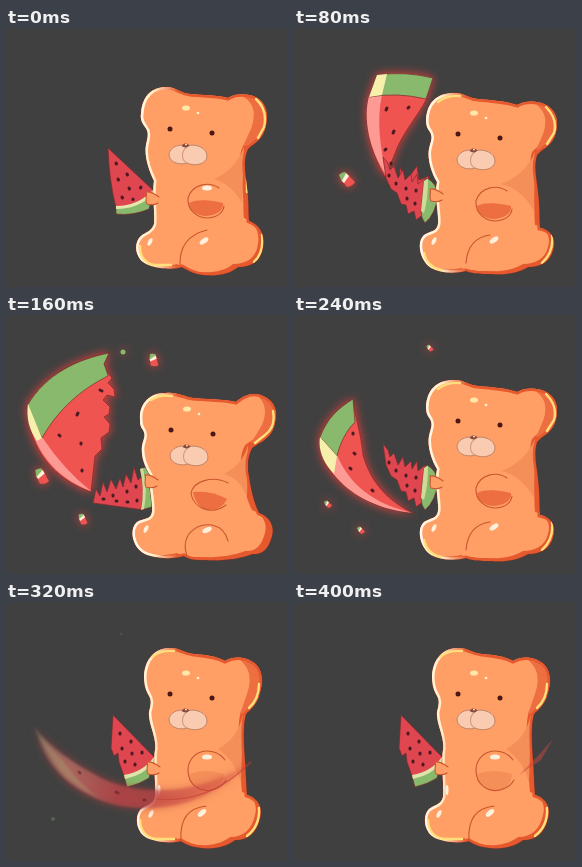
Write an HTML page without scripts that moves like this. It is 282 by 259 pixels and loops after 480 ms.

```html
<!DOCTYPE html>
<html lang="en">
<head>
<meta charset="utf-8">
<title>Gummy bear and watermelon</title>
<style>
html, body { margin: 0; width: 100%; height: 100%; overflow: hidden; background: #404040; }
svg { display: block; width: 100%; height: 100%; }

.pose { visibility: hidden; animation: once .48s step-end infinite; animation-delay: calc(var(--at) * 80ms - 480ms); }
.twice { animation-name: twice; }
.hold { animation-name: hold; }
@keyframes once { 0% { visibility: visible } 16.666%, 100% { visibility: hidden } }
@keyframes hold { 0% { visibility: visible } 33.333%, 100% { visibility: hidden } }
@keyframes twice {
  0%, 33.333% { visibility: visible }
  16.666%, 49.999%, 100% { visibility: hidden }
}

.edge { fill: #e6592f; stroke: #6d352a; stroke-width: 1.2; }
.skin { fill: #ff9f65; }
.rim { fill: none; stroke: url(#rim); stroke-width: 5; }
.shade { fill: #f58f59; }
.deep { fill: #ec6e41; }
.line { fill: none; stroke: #c9552f; stroke-width: 1.1; stroke-linecap: round; }
.gold { fill: none; stroke: #ffdf7c; stroke-width: 2.4; stroke-linecap: round; }
.shine { fill: #fff0dc; }
.red { fill: #ef5450; }
.held .red { fill: #df4650; }
.pink { fill: #fc9a93; }
.green { fill: #88b96c; }
.cream { fill: #f6f0ac; }
.seed { fill: none; stroke: #4a1b20; stroke-width: 3; stroke-linecap: round; }
.cut { stroke: #7b2b2b; stroke-width: .7; stroke-linejoin: round; }
.glow { filter: drop-shadow(0 0 5px #e8403c); }
</style>
</head>
<body>
<svg viewBox="0 0 282 259">
<defs>
  <linearGradient id="rim" gradientUnits="userSpaceOnUse" x1="128" y1="0" x2="172" y2="0">
    <stop stop-color="#fffaf0"/><stop offset=".45" stop-color="#fff0cc"/><stop offset="1" stop-color="#e6592f"/>
  </linearGradient>
  <linearGradient id="trail" gradientUnits="userSpaceOnUse" x1="28" y1="125" x2="240" y2="175">
    <stop stop-color="#c8a08c" stop-opacity=".15"/><stop offset=".2" stop-color="#b57a70" stop-opacity=".65"/>
    <stop offset=".45" stop-color="#b8454a" stop-opacity=".7"/><stop offset="1" stop-color="#d8493f" stop-opacity=".25"/>
  </linearGradient>

  <clipPath id="sitClip"><path id="sit" d="M135 86C136 68 146 59 160 59C171 59 173 65 184 66S212 67 222 70C230 65 240 66 247 68C259 72 263 84 260 97C257 112 249 114 242 121C236 133 240 148 241 160C243 175 242 185 243 193C254 197 259 207 257 219C255 233 246 239 232 239C224 246 212 248 198 247C188 246 183 243 176 239C168 242 150 241 140 236C129 230 127 215 135 208C140 204 146 203 148 196C149 185 146 165 148 153C143 143 138 128 140 117C142 108 143 104 139 99C136 95 134 91 135 86Z"/></clipPath>
  <clipPath id="chewClip"><path id="chew" d="M132 92C133 74 143 66 158 65C170 64 173 70 184 71S212 73 223 77C232 72 243 73 250 76C262 81 265 92 262 104C259 117 250 119 243 127C239 140 243 152 244 165C246 180 245 190 246 200C258 202 262 212 259 222C256 234 246 239 234 239C224 245 212 247 198 246C188 246 180 246 172 243C160 246 146 245 137 240C126 233 122 214 130 207C136 203 143 204 144 196C145 185 140 168 143 154C138 146 133 132 135 121C137 112 139 110 136 104C133 100 132 97 132 92Z"/></clipPath>
  <clipPath id="squashClip"><path id="squash" d="M134 104C133 88 145 77 160 78C172 77 178 82 187 83S218 84 230 87C239 79 249 77 257 81C269 86 272 97 269 107C267 122 256 126 246 133C241 143 241 152 243 162C245 176 248 188 253 198C266 203 269 214 265 224C262 234 256 240 246 239C234 244 216 246 200 245C190 245 184 245 178 241C164 245 146 243 137 238C126 231 123 214 131 207C137 203 145 205 146 197C147 185 142 172 144 160C138 150 135 141 136 131C138 122 140 121 137 115C134 111 134 108 134 104Z"/></clipPath>
  <clipPath id="tallClip"><path id="tall" d="M138 74C139 56 150 46 164 46C175 46 177 51 188 52S210 54 219 59C228 54 238 55 245 59C256 64 258 78 254 90C251 103 246 105 240 112C236 125 238 145 239 160C240 175 240 184 241 193C252 196 257 206 254 216C251 230 243 238 229 238C220 245 208 247 196 246C187 245 181 243 175 239C165 242 150 240 141 236C130 230 128 214 135 207C140 203 147 203 149 195C150 183 147 160 149 148C151 135 142 122 143 110C145 102 146 98 142 92C139 87 138 80 138 74Z"/></clipPath>

  <g id="face">
    <ellipse class="shine" cx="16" cy="-21" rx="4" ry="2.6" style="fill:#ffe9a8"/>
    <circle class="shine" cx="28" cy="-16" r="1.3"/>
    <circle r="2.5" fill="#4a1714"/><circle cx="42" cy="4" r="2.5" fill="#4a1714"/>
    <path d="M17 17C8 14-1 19-1 26C0 35 12 36 17 34C25 38 37 35 37 27C37 19 26 14 17 17Z" fill="#f9cbb0" stroke="#b97e64" stroke-width=".9"/>
    <path class="line" d="M17 18C11 22 11 31 17 34" style="stroke:#d39a80"/>
    <path d="M11.500 17Q15 12 19.500 16.500Q16 20 11.500 17Z" fill="#8a4a3a"/>
    <circle cx="16" cy="15.500" r="1" fill="#ffe0c8"/>
  </g>
  <g id="arm">
    <path class="deep" d="M-17 2C-8-3 8 0 17 2C18 10 9 15-1 15C-10 14-16 10-17 2Z"/>
    <path class="line" d="M13-13C3-20-14-17-18-3C-19 10-8 17 2 17C12 16 17 12 18 5"/>
  </g>
  <g id="paw">
    <path class="skin" d="M-5-6C0-7 6-3 8 1C8 6 2 8-4 6C-6 2-4-1-5-6Z"/>
    <path class="line" d="M8-1C4-4 0-7-5-6C-3-2-7 2-4 6Q2 8 7 5"/>
  </g>
  <g id="bit">
    <path class="red" d="M-2-7L8 3Q6 7 0 8L-4 3Z"/>
    <path class="green" d="M-8-4Q-5-7-2-7L0-3L-5 3Z"/>
    <path d="M-1-6L2-3L-3 4L-5 2Z" fill="#fff0d8"/>
  </g>
  <g id="wedge" class="held">
    <path class="red cut" d="M0 0L46 43Q30 60 8 60Q1 32 0 0Z"/>
    <path class="green cut" d="M46 43L41 61Q25 68 8 66L8 59Q30 59 46 43Z"/>
    <path d="M8 58Q30 58 45 42L45 46Q31 61 8 61Z" fill="#e3e7ac"/>
    <path class="seed" d="M8 15l.5 1M19 26l.5 1M10 31l.5 1M21 40l.5 1M33 39l-.5 1M14 49l.5 1M25 51v.5"/>
  </g>
  <g id="rag" class="held">
    <path class="red cut" d="M89 129L94 135L96 142L100 138L104 150L109 142L111 152L117 146L118 154L123 146L124 156L131 150L130 186L122 192L120 183L114 186L112 177L107 176L103 165L97 161L92 150Z"/>
    <path class="green cut" d="M133 150Q142 155 144 166Q142 186 131 195Q127 190 127 183L130 153Z"/>
    <path d="M130 153L134 151Q134 171 130 185L127 183Z" fill="#cddb96"/>
    <path class="seed" d="M95 147v1M102 155v1M112 160v1M113 170v1M122 162v1M121 175v1"/>
  </g>
</defs>

<g class="pose" style="--at:0">
  <use href="#wedge" x="102" y="120"/>
  <use href="#sit" class="edge"/>
  <g clip-path="url(#sitClip)">
    <use href="#sit" class="skin" x="-5" y="-3"/>
    <path class="deep" d="M234 67Q254 76 245 101L237 118L265 114V65Z"/>
    <path class="shade" d="M238 119Q229 142 208 151Q226 157 236 175Z"/>
    <use href="#sit" class="rim"/>
    <path class="gold" d="M250 71Q262 82 258 99L252 110M256 207Q258 225 248 234M241 150v14M134 218Q134 234 148 237H165"/>
  </g>
  <path class="line" d="M174 237Q173 209 201 202"/>
  <use href="#arm" x="200" y="173"/>
  <ellipse class="shine" cx="201" cy="160" rx="5" ry="2.500"/>
  <ellipse class="shine" cx="198" cy="213" rx="5" ry="2.500" transform="rotate(-35 198 213)"/>
  <ellipse class="shine" cx="144" cy="214" rx="2" ry="4" transform="rotate(25 144 214)"/>
  <use href="#face" x="164" y="101"/>
  <use href="#paw" x="145" y="170"/>
</g>

<g class="pose glow" style="--at:1">
  <path class="red cut" d="M75 68Q105 64 133 70C125 87 107 106 100 128L91 149C75 121 69 91 75 68Z"/>
  <path class="pink" d="M75 68L88 67C82 94 87 121 92 147C75 121 69 91 75 68Z"/>
  <path class="green cut" d="M83 47Q111 43 139 50L132 71Q103 64 75 69Z"/>
  <path class="cream" d="M83 47L93 46L88 67L75 69Z"/>
  <path class="seed" d="M93 80l-1 2M115 79l-1 1M100 103l-1 2M92 121l-1 1M97 135v1"/>
  <use href="#bit" x="53" y="151"/>
</g>
<g class="pose held" style="--at:1"><path class="red cut" d="M91 148L105 164L106 139L112 153L123 138L125 152L135 148L132 166L110 168L98 161Z"/></g>

<g class="pose glow" style="--at:3">
  <path class="red cut" d="M59 84C61 102 67 118 69 140C77 168 94 186 119 198C79 195 46 174 31 148C20 121 38 97 59 84Z"/>
  <path class="pink" d="M43 140C55 169 79 189 119 198C80 194 54 178 39 158Z"/>
  <path class="green cut" d="M59 84L61 107C52 116 46 128 43 141L26 122C33 104 43 94 59 84Z"/>
  <path class="cream" d="M26 122L43 141L40 159C29 148 24 135 26 122Z"/>
  <path class="seed" d="M59 118v1M60 138l1 1M56 153l1 1M78 175l1 1"/>
  <use href="#bit" transform="translate(136 33) scale(.45)"/>
  <use href="#bit" transform="translate(34 189) scale(.5)"/>
  <use href="#bit" transform="translate(67 215) scale(.5)"/>
</g>

<g class="pose twice" style="--at:1">
  <use href="#rag"/>
  <use href="#chew" class="edge"/>
  <g clip-path="url(#chewClip)">
    <use href="#chew" class="skin" x="-5" y="-3"/>
    <path class="deep" d="M238 74Q257 84 249 106L242 122L268 120V72Z"/>
    <path class="shade" d="M241 124Q231 147 207 156Q228 161 240 183Z"/>
    <use href="#chew" class="rim"/>
    <path class="gold" d="M252 79Q264 91 260 105L253 116M258 207Q260 224 248 235M144 74Q153 67 166 68M130 225Q133 239 147 242"/>
  </g>
  <path class="line" d="M172 235Q174 210 196 207"/>
  <use href="#arm" x="200" y="176"/>
  <ellipse class="shine" cx="200" cy="212" rx="5" ry="2.500" transform="rotate(-35 200 212)"/>
  <ellipse class="shine" cx="140" cy="213" rx="2" ry="4" transform="rotate(25 140 213)"/>
  <use href="#face" x="164" y="106"/>
  <use href="#paw" x="141" y="167"/>
</g>

<g class="pose" style="--at:2">
  <g class="glow">
    <path class="red cut" d="M103 38L98 49L101 57L106 63L102 68L108 74L109 82L101 80L97 85L104 92L103 99L98 102L104 109L103 117L95 123L96 134L89 141L85 177C49 164 23 136 21 91C40 58 73 44 103 38Z"/>
    <path class="pink" d="M36 122Q58 155 85 176C57 166 37 146 28 121Z"/>
    <path class="green cut" d="M103 38L98 49L101 57L102 61C76 74 53 93 36 123L21 91C40 58 73 44 103 38Z"/>
    <path class="cream" d="M22 89L36 123L31 126C23 115 20 102 22 89Z"/>
    <path class="seed" d="M94 75l2 1M72 98l-1 2M53 120l1 1M75 128v1M76 155v1"/>
    <use href="#bit" transform="translate(148 45) rotate(30) scale(.8)"/>
    <use href="#bit" transform="translate(36 161) rotate(15)"/>
    <use href="#bit" transform="translate(77 204) rotate(20) scale(.7)"/>
    <circle class="green" cx="117" cy="37" r="2.500"/>
  </g>
  <g class="held">
    <path class="red cut" d="M87 188L90 174L94 181L97 167L101 177L105 164L110 174L114 163L117 172L120 159L125 168L128 152L132 165L140 158L138 195Z"/>
    <path class="green cut" d="M134 154L143 151Q150 172 146 192L135 195Q140 174 134 154Z"/>
    <path d="M134 154L137 153Q142 174 138 194L135 195Q139 174 134 154Z" fill="#cddb96"/>
    <path class="seed" d="M97 184h1M107 180v1M110 186h1M121 176v1M121 187h1M130 171v1M131 185v1"/>
  </g>
  <use href="#squash" class="edge"/>
  <g clip-path="url(#squashClip)">
    <use href="#squash" class="skin" x="-7" y="-3"/>
    <path class="deep" d="M248 78Q265 89 256 110L245 128L275 126V76Z"/>
    <path class="shade" d="M242 130Q237 149 218 159Q235 164 241 183Z"/>
    <use href="#squash" class="rim"/>
    <path class="gold" d="M267 96Q270 112 259 120L249 128M145 85Q154 79 166 81"/>
  </g>
  <path class="deep" d="M187 177Q205 175 221 184Q216 195 203 195Q190 193 187 177Z"/>
  <path class="line" d="M222 168C207 160 186 166 185 179C188 193 205 201 220 190M181 241C174 220 190 208 206 210Q219 213 222 226"/>
  <ellipse class="shine" cx="201" cy="215" rx="5" ry="2.500" transform="rotate(-25 201 215)"/>
  <ellipse class="shine" cx="140" cy="214" rx="2" ry="4" transform="rotate(25 140 214)"/>
  <use href="#face" x="165" y="115"/>
  <use href="#paw" x="144" y="166"/>
</g>

<g class="pose hold" style="--at:4">
  <g class="held">
    <path class="red cut" d="M107 113L149 156Q138 171 118 174L113 160L112 151L108 154L105 146Z"/>
    <path class="green cut" d="M149 156L143 176Q134 182 121 185L118 174Q138 171 149 156Z"/>
    <path d="M118 173Q137 170 148 155V160Q138 173 119 177Z" fill="#dfe5aa"/>
    <path class="seed" d="M114 131v1M125 139v1M116 146v1M126 151v1M136 150v1M119 159v1M129 162v1"/>
  </g>
  <use href="#tall" class="edge"/>
  <g clip-path="url(#tallClip)">
    <use href="#tall" class="skin" x="-5" y="-3"/>
    <path class="deep" d="M233 57Q249 69 241 92L234 112L260 106V55Z"/>
    <path class="shade" d="M237 113Q231 137 212 147Q230 160 235 181Z"/>
    <use href="#tall" class="rim"/>
    <path class="gold" d="M253 82Q253 97 243 106M253 206Q254 224 241 234M146 55Q154 48 168 49M134 218Q135 235 150 237H168"/>
  </g>
  <path class="line" d="M175 238Q173 207 200 204"/>
  <path class="shade" d="M183 172Q200 166 218 172Q216 189 201 189Q185 187 183 172Z"/>
  <path class="line" d="M219 158C209 144 185 146 182 166C181 184 196 192 209 187Q217 184 220 178"/>
  <ellipse class="shine" cx="201" cy="155" rx="5" ry="2.500"/>
  <ellipse class="shine" cx="196" cy="211" rx="5" ry="2.500" transform="rotate(-40 196 211)"/>
  <ellipse class="shine" cx="153" cy="188" rx="1.500" ry="5"/>
  <ellipse class="shine" cx="145" cy="212" rx="2" ry="4" transform="rotate(25 145 212)"/>
  <use href="#face" x="164" y="92"/>
  <use href="#paw" x="146" y="166"/>
</g>

<g class="pose" style="--at:4">
  <g style="filter:blur(1px) drop-shadow(0 0 4px #b8403c)">
    <path d="M28 124C45 146 66 161 95 176C130 193 190 197 247 158C210 196 172 207 134 206C84 204 40 174 28 124Z" fill="url(#trail)"/>
    <path d="M33 133C46 164 66 184 92 195Q72 181 58 160Z" fill="#a8946e" opacity=".5"/>
  </g>
  <path class="line" d="M150 197C185 200 215 190 245 160" style="stroke:#c23f35" opacity=".6"/>
  <path class="seed" d="M73 170l1 1M110 190l2 1M138 198h1" opacity=".5"/>
  <circle class="green" cx="47" cy="217" r="2" opacity=".3"/>
  <circle class="green" cx="115" cy="32" r="1.500" opacity=".15"/>
</g>

<path class="pose" style="--at:5" d="M225 173L243 155L259 137L247 158Z" fill="#c9473e" opacity=".5"/>
</svg>
</body>
</html>
```
